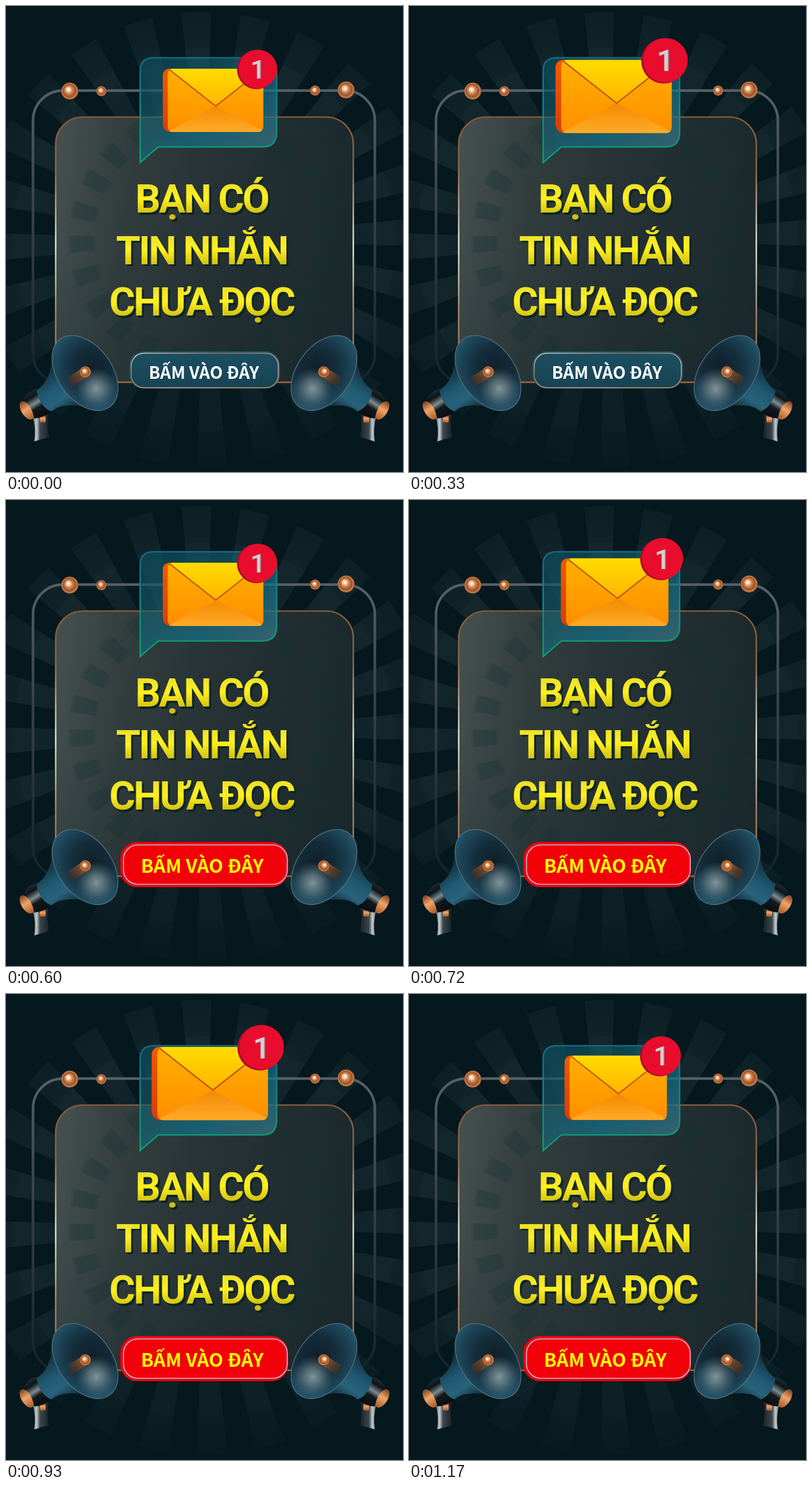
An HTML page that plays this animation: 691x810 px, repeating every 1200 ms.

```html
<!DOCTYPE html>
<html lang="vi">
<head>
<meta charset="utf-8">
<style>
html, body { margin: 0; width: 100%; height: 100%; overflow: hidden; background: #05181e; }
svg { display: block; width: 100%; height: 100%; }
text { text-anchor: middle; font-weight: 700; }
.title { font: 700 69px Roboto, sans-serif; letter-spacing: -3px; }
.label { font-family: "Noto Sans CJK JP", "Noto Sans CJK SC", "Noto Sans", sans-serif; }
.digit text { font: 500 45px Roboto, sans-serif; }
</style>
</head>
<body>
<svg viewBox="0 0 691 810">
  <defs>
    <radialGradient id="ray" gradientUnits="userSpaceOnUse" cx="345" cy="406" r="398">
      <stop offset=".3" stop-color="#a9c0c4" stop-opacity=".02"/>
      <stop offset=".83" stop-color="#a9c0c4" stop-opacity=".09"/>
      <stop offset=".84" stop-color="#a9c0c4" stop-opacity=".065"/>
      <stop offset="1" stop-color="#a9c0c4" stop-opacity=".045"/>
    </radialGradient>
    <radialGradient id="innerRay" gradientUnits="userSpaceOnUse" cx="345" cy="406" r="398">
      <stop offset=".47" stop-color="#0f2f2f" stop-opacity="0"/>
      <stop offset=".49" stop-color="#0f2f2f" stop-opacity=".3"/>
      <stop offset=".58" stop-color="#0f2f2f" stop-opacity=".3"/>
      <stop offset=".6" stop-color="#0f2f2f" stop-opacity="0"/>
    </radialGradient>
    <linearGradient id="floor" x2="0" y2="1">
      <stop stop-color="#05181e" stop-opacity="0"/><stop offset="1" stop-color="#05181e" stop-opacity=".65"/>
    </linearGradient>
    <linearGradient id="frame" x2="0" y2="1">
      <stop stop-color="#586166"/><stop offset=".35" stop-color="#3b464b"/><stop offset="1" stop-color="#142329"/>
    </linearGradient>
    <linearGradient id="panel">
      <stop stop-color="#4a5453" stop-opacity=".95"/><stop offset=".22" stop-color="#384241" stop-opacity=".92"/>
      <stop offset=".5" stop-color="#2a3537" stop-opacity=".95"/><stop offset="1" stop-color="#1c2a2e" stop-opacity=".95"/>
    </linearGradient>
    <linearGradient id="shade" x2="0" y2="1">
      <stop stop-color="#14262a" stop-opacity="0"/><stop offset=".5" stop-color="#14262a" stop-opacity=".1"/>
      <stop offset="1" stop-color="#14262a" stop-opacity=".4"/>
    </linearGradient>
    <linearGradient id="bronze" x2="0" y2="1">
      <stop stop-color="#86593a"/><stop offset=".2" stop-color="#8d6649"/><stop offset=".48" stop-color="#e6dfd2"/>
      <stop offset=".75" stop-color="#a08168"/><stop offset="1" stop-color="#a8683c"/>
    </linearGradient>
    <radialGradient id="ball" cx=".5" cy=".5" r=".5" fx=".4" fy=".38">
      <stop stop-color="#fff"/><stop offset=".18" stop-color="#ffe3c4"/><stop offset=".4" stop-color="#d98b55"/>
      <stop offset=".72" stop-color="#9a5229"/><stop offset=".9" stop-color="#c98352"/><stop offset="1" stop-color="#6a3719"/>
    </radialGradient>
    <linearGradient id="bubble" x2="1" y2="1">
      <stop stop-color="#0b4657" stop-opacity=".75"/><stop offset=".3" stop-color="#176070" stop-opacity=".6"/>
      <stop offset=".6" stop-color="#127088" stop-opacity=".7"/><stop offset="1" stop-color="#47707c" stop-opacity=".8"/>
    </linearGradient>
    <linearGradient id="bubbleEdge" x2="0" y2="1">
      <stop stop-color="#146b82"/><stop offset=".5" stop-color="#128a86"/><stop offset="1" stop-color="#0ba070"/>
    </linearGradient>
    <linearGradient id="side" x2="0" y2="1"><stop stop-color="#f25a00"/><stop offset="1" stop-color="#d83c08"/></linearGradient>
    <linearGradient id="front" x2="0" y2="1"><stop stop-color="#ffb000"/><stop offset="1" stop-color="#ff8e00"/></linearGradient>
    <linearGradient id="flap" x2="0" y2="1"><stop stop-color="#ffdc00"/><stop offset="1" stop-color="#ffb400"/></linearGradient>
    <linearGradient id="fold" x2="0" y2="1"><stop stop-color="#f28a00"/><stop offset="1" stop-color="#ffab28"/></linearGradient>
    <linearGradient id="gold" x2=".04" y2="1">
      <stop offset=".15" stop-color="#e9de2a"/><stop offset=".5" stop-color="#fff01f"/><stop offset=".83" stop-color="#cfc010"/>
    </linearGradient>
    <linearGradient id="blue" x2="0" y2="1"><stop stop-color="#1c4f62"/><stop offset="1" stop-color="#174353"/></linearGradient>
    <linearGradient id="blueEdge" x2="1" y2="1">
      <stop stop-color="#e5dccb"/><stop offset=".3" stop-color="#93765a"/><stop offset=".65" stop-color="#c8b698"/><stop offset="1" stop-color="#b78a5c"/>
    </linearGradient>
    <radialGradient id="bell" gradientUnits="userSpaceOnUse" cx="137" cy="622" r="84">
      <stop stop-color="#10202a"/><stop offset=".4" stop-color="#142c3a"/><stop offset=".75" stop-color="#1d4659"/><stop offset="1" stop-color="#2a5f78"/>
    </radialGradient>
    <radialGradient id="glow">
      <stop stop-color="#93a5aa" stop-opacity=".85"/><stop offset=".4" stop-color="#7d949b" stop-opacity=".6"/><stop offset="1" stop-color="#5a7a86" stop-opacity="0"/>
    </radialGradient>
    <linearGradient id="horn" x1=".1" y1=".2" x2=".7" y2="1">
      <stop stop-color="#13222b"/><stop offset=".4" stop-color="#1f5871"/><stop offset=".65" stop-color="#28637c"/><stop offset="1" stop-color="#0c1b25"/>
    </linearGradient>
    <linearGradient id="barrel" x1=".2" y1="0" x2=".8" y2="1">
      <stop stop-color="#2a353a"/><stop offset=".25" stop-color="#0c1418"/><stop offset=".45" stop-color="#7f8b8f"/>
      <stop offset=".6" stop-color="#12191d"/><stop offset="1" stop-color="#05090c"/>
    </linearGradient>
    <linearGradient id="copper" x2="0" y2="1">
      <stop stop-color="#7a4020"/><stop offset=".45" stop-color="#f0a468"/><stop offset="1" stop-color="#a75a28"/>
    </linearGradient>
    <linearGradient id="strap">
      <stop stop-color="#596367"/><stop offset=".25" stop-color="#c5cbcd"/><stop offset=".45" stop-color="#3c474c"/><stop offset="1" stop-color="#182226"/>
    </linearGradient>
    <linearGradient id="rod" x1="1" y1="0" x2="0" y2="1"><stop stop-color="#b56b38"/><stop offset="1" stop-color="#3a2118" stop-opacity=".4"/></linearGradient>

    <g id="megaphone">
      <path d="M46 711L74 709Q70 727 75 750L62 753L49 757Q53 735 46 711Z" fill="url(#strap)"/>
      <rect x="59" y="711" width="10" height="13" rx="2" fill="url(#copper)"/>
      <ellipse cx="36" cy="703" rx="9" ry="18" transform="rotate(-33 36 703)" fill="url(#copper)"/>
      <path d="M31 684Q36 670 54 665L80 704Q66 716 49 717Q46 697 31 684Z" fill="url(#barrel)"/>
      <path d="M79 608Q80 650 53 668Q58 696 79 705Q102 684 160 703Z" fill="url(#horn)"/>
      <g transform="rotate(54 137.5 638)">
        <ellipse cx="137.500" cy="638" rx="73" ry="47" fill="url(#bell)" stroke="#58717d" stroke-width="1.3"/>
        <ellipse cx="171" cy="638" rx="36" ry="36" fill="url(#glow)"/>
      </g>
      <path d="M135 628L108 645L114 663L142 644Z" fill="url(#rod)"/>
      <circle cx="138" cy="636" r="10" fill="url(#ball)"/>
    </g>
  </defs>

  <rect width="691" height="810" fill="#05181e"/>
  <path id="rays" fill="url(#ray)"/>
  <rect y="520" width="691" height="290" fill="url(#floor)"/>
  <rect x="47" y="147" width="595" height="509" rx="52" fill="none" stroke="url(#frame)" stroke-width="4.5"/>
  <g id="balls" fill="url(#ball)"></g>
  <rect x="86.5" y="193" width="518" height="461" rx="47" fill="url(#panel)"/>
  <path id="innerRays" fill="url(#innerRay)"/>
  <rect x="86.5" y="193" width="518" height="461" rx="47" fill="url(#shade)" stroke="url(#bronze)" stroke-width="2.6"/>
  <path d="M233.500 272V113Q233.500 90 257 90H447Q471 90 471 114V220Q471 245 446 245H265Z" fill="url(#bubble)" stroke="url(#bubbleEdge)" stroke-width="2.5"/>

  <g id="mail">
    <path d="M283 109H300V219H285Q273 217 273 204V121Q273 111 283 109Z" fill="url(#side)"/>
    <rect x="281.500" y="109" width="166.500" height="110" rx="9" fill="url(#front)"/>
    <path d="M284 217L365 174L446 216Q444 219 439 219H290Q286 219 284 217Z" fill="url(#fold)"/>
    <path d="M285 111Q287 109 290 109H439Q443 109 445 111L365 174Z" fill="url(#flap)"/>
    <path d="M285 111L365 174L445 111" fill="none" stroke="#bd4a0c" stroke-width="1.8"/>
    <circle cx="436" cy="110.500" r="34" fill="#b00a2a"/>
    <circle cx="438.500" cy="109.500" r="33.500" fill="#e80d2d"/>
    <g class="digit">
      <text x="439.500" y="126" fill="#9c8e92">1</text>
      <text x="438" y="126" fill="#d3d0d1">1</text>
    </g>
  </g>

  <g id="title" class="title"></g>

  <g id="calm" class="label">
    <rect x="214.500" y="600" width="262.500" height="65" rx="25" fill="#245063"/>
    <rect x="218" y="603.500" width="256" height="60" rx="22" fill="url(#blue)" stroke="url(#blueEdge)" stroke-width="1.6"/>
    <text x="344.500" y="648" font-size="29.300" fill="#fff">BẤM VÀO ĐÂY</text>
  </g>
  <g id="alert" class="label">
    <rect x="199" y="594.500" width="292" height="78.500" rx="29" fill="#ee0008"/>
    <rect x="204.500" y="599.500" width="285" height="68.500" rx="25" fill="#f2000a" stroke="#b9c9ea" stroke-width="1.6"/>
    <text x="341.500" y="648" font-size="32.600" fill="#ff0">BẤM VÀO ĐÂY</text>
  </g>

  <use href="#megaphone"/>
  <use href="#megaphone" transform="matrix(-1 0 0 1 691 0)"/>
</svg>
<script>
const $ = id => document.getElementById(id);

const polar = (radius, degrees) => {
  const a = degrees * Math.PI / 180;
  return `${345 + radius * Math.sin(a)} ${406 - radius * Math.cos(a)}`;
};
let wedges = "";
for (let a = -2; a < 358; a += 15)
  wedges += `M345 406L${polar(396, a - 3.75)}A396 396 0 0 1 ${polar(396, a + 3.75)}Z`;
$("rays").setAttribute("d", wedges);
$("innerRays").setAttribute("d", wedges);

$("balls").innerHTML = [[111, 148, 15], [166, 148, 9], [538, 147, 9], [592, 146, 15]]
  .map(([x, y, r]) => `<circle cx="${x}" cy="${y}" r="${r}"/>`).join("");

$("title").innerHTML = ["BẠN CÓ", "TIN NHẮN", "CHƯA ĐỌC"].map((line, i) => {
  const y = 359 + 89.5 * i;
  return `<text x="344" y="${y + 3.5}" fill="#0e2422">${line}</text>
    <text x="340.5" y="${y}" fill="url(#gold)">${line}</text>`;
}).join("");

const LOOP = 1200, HALF = LOOP / 2, STEP = 30;

function draw(now) {
  const t = Math.floor(now % LOOP / STEP) * STEP;
  const second = t >= HALF;
  const pulse = 1 - Math.abs(t % HALF / (HALF / 2) - 1);
  const [x, y] = second ? [397, 218] : [388, 206];
  $("mail").setAttribute("transform",
    `translate(${x} ${y}) scale(${1 + 0.174 * pulse}) translate(${-x} ${-y})`);
  $("calm").style.display = second ? "none" : "";
  $("alert").style.display = second ? "" : "none";
  requestAnimationFrame(() => draw(performance.now()));
}
draw(performance.now());
</script>
</body>
</html>
```
